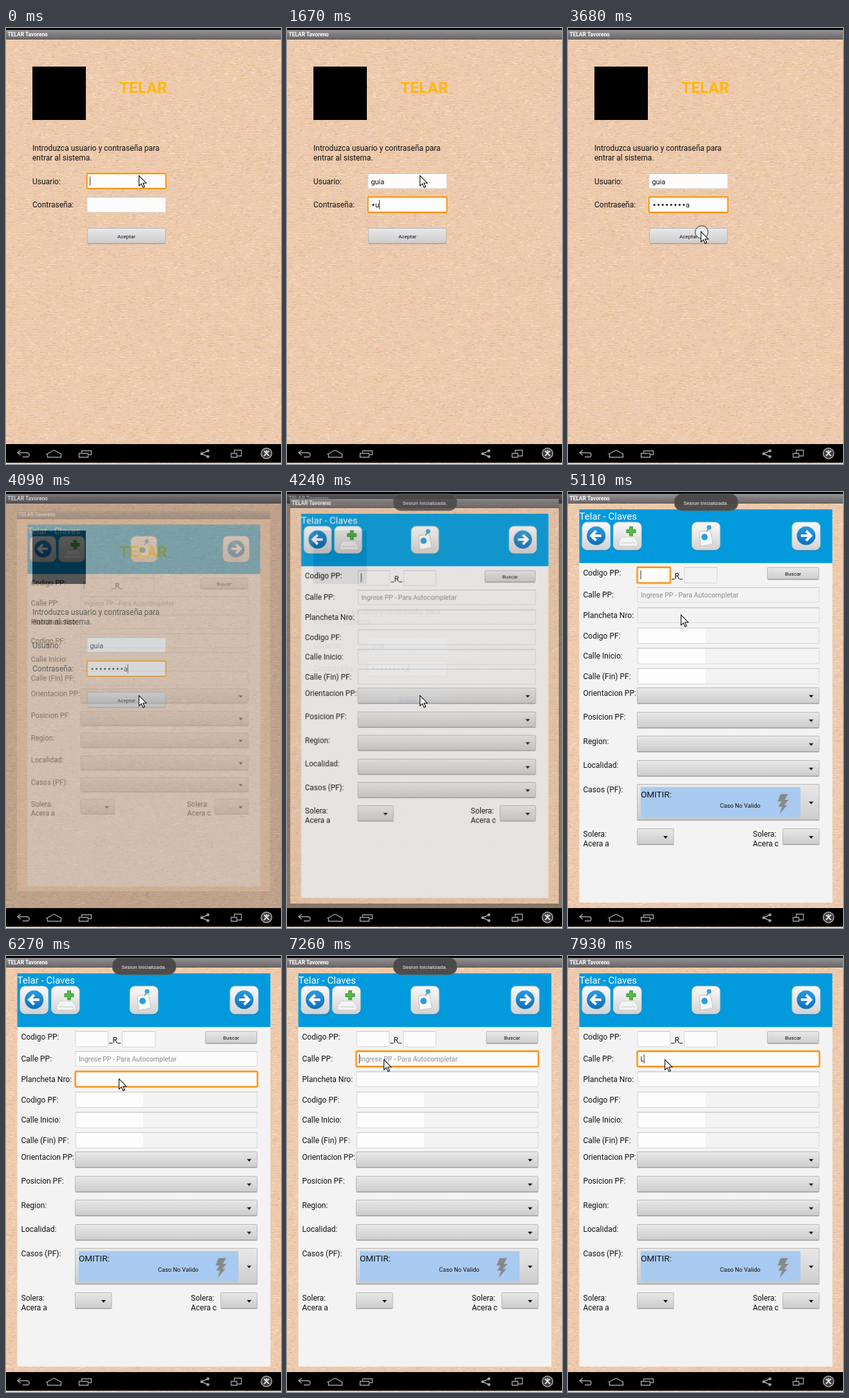
Animation of 427 by 678 pixels, one loop 8000 ms. Source, as an HTML page with a canvas:

```html
<!DOCTYPE html>
<html lang="es">
<head>
<meta charset="utf-8">
<title>Inicio de sesión</title>
<style>
html, body { margin: 0; width: 100%; height: 100%; overflow: hidden; background: #000; }
canvas { display: block; }
</style>
</head>
<body>
<canvas id="stage" width="427" height="678"></canvas>
<script>
const W = 427, H = 678, LOOP = 8000;
const APP = 'TELAR', OWNER = 'Tavoreno', USER = 'guia', PASSWORD = 'culebrina';
const ORANGE = '#f68e16', PANEL = '#f3f3f3';
const stage = document.getElementById('stage').getContext('2d');
const newLayer = (w, h) => {
  const c = document.createElement('canvas');
  c.width = w; c.height = h;
  return c.getContext('2d');
};
const buffer = newLayer(W, H), cloth = newLayer(W, H);
let g = stage; // context being drawn on

// Pointer steps: time, x, y, click ring radius
const POINTER = [
  [0, 206.5, 229.5, 0],
  [3150, 206.5, 245, 0], [3290, 206.5, 280, 0], [3420, 206.5, 305, 0],
  [3550, 206.5, 316.5, 0], [3680, 206.5, 316.5, 10], [3820, 206.5, 316.5, 0],
  [4540, 205, 300, 0], [4680, 202, 268, 0], [4820, 196, 240, 0],
  [4960, 187, 212, 0], [5110, 175.5, 191, 0],
  [5700, 175.5, 191, 10], [5980, 175.5, 191, 0],
  [6720, 168, 180, 0], [6850, 157, 168, 0], [6990, 150.5, 161, 10], [7130, 150.5, 161, 0]
];
const USER_KEYS = [[0, 0], [430, 1], [560, 2], [690, 4]];
const PASS_KEYS = [0, 1390, 1670, 1810, 2090, 2210, 2330, 2600, 2740, 2880].map((t, n) => [t, n]);
const TOAST = [[0, 0], [4240, .85], [4390, 1], [7530, .7], [7660, .35], [7800, 0]];

const at = (keys, t) => keys.filter(k => k[0] <= t).pop();
const within = (t, a, b) => t >= a && t < b;

function rect(x, y, w, h, fill) {
  g.fillStyle = fill;
  g.fillRect(x, y, w, h);
}
function round(x, y, w, h, r, fill, stroke, line = 1) {
  g.beginPath();
  g.roundRect(x, y, w, h, r);
  if (fill) { g.fillStyle = fill; g.fill(); }
  if (stroke) { g.strokeStyle = stroke; g.lineWidth = line; g.stroke(); }
}
function disc(x, y, r, fill) {
  g.beginPath();
  g.arc(x, y, r, 0, 7);
  g.fillStyle = fill;
  g.fill();
}
function shape(d, x, y, fill, stroke, line = 1) {
  const p = new Path2D(d);
  g.save();
  g.translate(x, y);
  if (fill) { g.fillStyle = fill; g.fill(p); }
  if (stroke) { g.strokeStyle = stroke; g.lineWidth = line; g.stroke(p); }
  g.restore();
}
function text(s, x, y, size = 12, color = '#111', weight = 400, align = 'left') {
  g.font = `${weight} ${size}px Roboto, sans-serif`;
  g.fillStyle = color;
  g.textAlign = align;
  g.fillText(s, x, y);
  return g.measureText(s).width;
}
function shade(y, h, ...colors) {
  const f = g.createLinearGradient(0, y, 0, y + h);
  colors.forEach((c, i) => f.addColorStop(i / (colors.length - 1), c));
  return f;
}
const caret = (x, y) => rect(x, y, 1, 14, '#333');

function weave() {
  let seed = 7;
  const rnd = n => (seed = seed * 16807 % 2147483647) % n;
  const rows = ['#f2d0b4', '#e8c1a3', '#f0cfb9', '#e9c8a4'];
  const threads = ['#e6b99f', '#f3d9bd', '#e8cb9c', '#efc4b2'];
  g = cloth;
  for (let y = 0; y < H; y++) {
    rect(0, y, W, 1, rows[y % 4]);
    for (let i = 0; i < 36; i++) rect(rnd(W), y, 2 + rnd(4), 1, threads[rnd(4)]);
  }
}

function field(x, y, w, h, focus, fill = '#fcfcfc') {
  if (focus) {
    round(x, y, w, h, 2, '#fdfdfd', '#fbd9a8', 4);
    round(x, y, w, h, 1.5, null, ORANGE, 1.8);
  } else {
    round(x + .5, y + .5, w - 1, h - 1, 1, fill, '#d9d7d5');
    rect(x, y, w, 1, '#c9c6c3');
  }
}
function button(x, y, w, h, label) {
  round(x + .5, y + .5, w - 1, h - 1, 1.5, shade(y, h, '#e9e9e9', '#dadada', '#cccccc'), '#b9b7b5');
  rect(x + 1, y + h - 1.5, w - 2, 1.5, '#a5a3a1');
  if (label) text(label, x + w / 2, y + h / 2 + 3.3, 8.1, '#111', 400, 'center');
}
function spinner(x, y, w, h) {
  button(x, y, w, h);
  shape('M0 0h7l-3.5 4z', x + w - 16.5, y + h / 2 - 1, '#111');
}

function windowBase() {
  g.drawImage(cloth.canvas, 0, 0);
  rect(0, 0, W, 3, '#000');
  rect(0, 3, W, 15, shade(3, 15, '#979495', '#7d7a7b', '#686566'));
  rect(0, 17, W, 1, '#5c5856');
  text(`${APP} ${OWNER}`, 2.5, 13, 8.4, '#fff', 700);
}

function login(t) {
  windowBase();
  rect(41, 60, 83, 83, '#000');
  text(APP, 176, 101, 24.4, '#fcb910', 700);
  text('Introduzca usuario y contraseña para', 41, 191);
  text('entrar al sistema.', 41, 205.5);
  text('Usuario:', 41, 242.5);
  text('Contraseña:', 41, 279);

  const onPass = t >= 820;
  field(125.5, 226, 123, 24, !onPass);
  field(125.5, 262.5, 123, 24.5, onPass);
  button(126, 311, 122, 25, 'Aceptar');

  const used = text(USER.slice(0, at(USER_KEYS, t)[1]), 130.5, 242.5, 10.8);
  if (t < 130 || within(t, 430, 820)) caret(130 + used, 231);

  const n = at(PASS_KEYS, t)[1], step = 6.55;
  for (let i = 0; i < n - 1; i++) disc(134 + i * step, 275, 1.6, '#111');
  const x = 130.5 + Math.max(0, n - 1) * step;
  const last = text(n ? PASSWORD[n - 1] : '', x, 279, 10.8);
  if (within(t, 820, 1260) || within(t, 1390, 3420) || t >= 3950) caret(x + last, 267.5);
}

function tile(x) {
  round(x, 48.5, 44, 43, 8, 'rgba(0,50,90,.35)');
  round(x, 47, 43.5, 43, 7.5, shade(47, 43, '#fafafa', '#e6e6e6', '#d2d2d2'), '#c9d3d8');
}
function arrowTile(x, dir) {
  tile(x);
  const cx = x + 21.7;
  disc(cx, 68, 14.5, shade(53, 30, '#2a9be0', '#0f6fb8'));
  g.save();
  g.translate(cx, 68);
  g.scale(dir, 1);
  shape('M-8 0H7M0-7.5L7.5 0L0 7.5', 0, 0, null, '#fff', 4);
  g.restore();
}
function header() {
  rect(17.5, 27, 393, 83.5, '#029adc');
  text('Telar - Claves', 17.5, 43, 15.1, '#fff');
  arrowTile(22, -1);
  arrowTile(348, 1);
  tile(70.5);
  shape('M4 0h20l5 8v6h-29v-6z', 79, 70, '#f4f4f4', '#cfcfcf');
  rect(82, 78, 23, 2, '#dcdcdc');
  shape('M0-7.5V7.5M-7.5 0H7.5', 98, 61, null, '#2e8a28', 5.5);
  shape('M0-6.5V6.5M-6.5 0H6.5', 98, 61, null, '#55bf45', 3.5);
  tile(192.5);
  shape('M0 3L17 0l4 22-19 3z', 204, 59, '#fdfdfd', '#c4c4c4');
  disc(212, 70, 5, '#2c9ddc');
  shape('M0 0L-4 7', 219, 55, null, '#777', 1.2);
  disc(219, 55, 3.6, '#3ba3dd');
}

function form(t) {
  windowBase();
  rect(17.5, 27, 393, 611.5, PANEL);
  header();

  const labels = [['Codigo PP:', 130], ['Calle PP:', 164], ['Plancheta Nro:', 195.5], ['Codigo PF:', 227.5],
    ['Calle Inicio:', 259], ['Calle (Fin) PF:', 290.5], ['Orientacion PP:', 316.5], ['Posicion PF:', 354],
    ['Region:', 391.5], ['Localidad:', 429], ['Casos (PF):', 467]];
  labels.forEach(([s, y]) => text(s, 23.5, y));
  text('_R_', 160, 135);

  const loaded = t >= 4390;
  const onCode = within(t, 4390, 5980), onPlan = within(t, 5980, 7130), onStreet = t >= 7130;
  const fresh = t >= 5980 ? '#fcfcfc' : PANEL;
  field(107.5, 117, 51.5, 24.5, onCode, fresh);
  field(180, 117, 52, 25, false, fresh);
  button(309, 117, 81, 19.5, 'Buscar');
  field(107.5, 148, 283, 24, onStreet, fresh);
  field(107.5, 179.5, 283, 24, onPlan, fresh);
  [[211, 4960], [242.5, 4820], [274, 4680]].forEach(([y, from]) => {
    field(107.5, y, 283, 25, false, PANEL);
    if (t >= from) rect(110, y + 1.5, 103, 22.5, '#fdfdfd');
  });

  const typed = t >= 7930;
  const used = text(typed ? 'L' : '', 112.5, 164, 10.5, '#222');
  if (!typed) text('Ingrese PP - Para Autocompletar', 113, 164, 10.5, '#8b8b8b');
  if (t < 5980) caret(112.5, 122);
  if (within(t, 5980, 6270)) caret(112.5, 184);
  if (onStreet) caret(112 + used, 153);

  [304, 342, 379, 417].forEach(y => spinner(107, y, 283.5, 25.5));
  spinner(107, 454, 283.5, loaded ? 57 : 25.5);
  if (loaded) {
    rect(113, 459, 248, 48, '#a9caf0');
    text('OMITIR:', 113, 475, 13.5);
    text('Caso No Valido', 236, 491, 9.2);
    shape('M5 0H17L12 9H18L11 17H16L3 32L7 20H1L6 12H0z', 325, 469.5, '#85898f', '#b3bac3', .8);
  }
  const dy = loaded ? 0 : -32;
  [[23.5, 107, 'a'], [287, 333, 'c']].forEach(([tx, sx, side]) => {
    text('Solera:', tx, 536 + dy);
    text('Acera ' + side, tx, 550.5 + dy);
    spinner(sx, 523 + dy, 57.5, 26);
  });
}

function opening(t) {
  const settled = t >= 4240, s = settled ? .977 : .92;
  login(t);
  rect(0, 3, W, 644, `rgba(0,0,0,${settled ? .42 : .2})`);
  g = buffer;
  form(t);
  g = stage;
  g.save();
  g.globalAlpha = settled ? .88 : .35;
  g.translate(213.5, 322);
  g.scale(s, s);
  g.drawImage(buffer.canvas, 0, 3, W, 644, -213.5, -319, W, 644);
  g.restore();
}

function toast(alpha) {
  g.globalAlpha = alpha;
  round(165, 3, 99, 26, 12, 'rgba(72,70,70,.95)', 'rgba(105,103,103,.8)');
  text('Sesion Inicializada.', 214, 19.5, 8.1, '#f2f2f2', 400, 'center');
  g.globalAlpha = 1;
}

function navBar() {
  const c = '#a2a2a2';
  rect(0, 647, W, 29, '#000');
  shape('M6 0L1 4L6 8M1 4H15Q19 4 19 7.5T15 10.5H9', 17, 656.5, null, c, 1.4);
  shape('M0 6L11 0L22 6V11H1V6z', 63.5, 656.5, null, c, 1.4);
  shape('M0 4H14V10H0zM4 3V0H19V6H15', 113.5, 657.5, null, c, 1.4);
  shape('M11 0L0 5L11 10', 303.5, 657, null, c, 1.4);
  [[304, 662], [313.5, 657.5], [313.5, 666.5]].forEach(p => disc(...p, 2.3, c));
  shape('M5 5V0H16V9H9M0 5H9V11H0z', 349.5, 656.5, null, c, 1.3);
  disc(404.5, 661.5, 9, c);
  disc(404.5, 661.5, 7.3, '#3a3a3a');
  shape('M-4-4L4 4M4-4L-4 4M0-5V0', 404.5, 661.5, null, '#ddd', 2);
}

function pointer(t) {
  const [, x, y, ring] = at(POINTER, t);
  if (ring) {
    disc(x + 1, y + 1, ring, 'rgba(255,255,255,.45)');
    g.strokeStyle = '#222';
    g.lineWidth = 1;
    g.stroke();
  }
  shape('M0 0V16L3.7 12.6L6.3 18.5L8.8 17.4L6.2 11.7H11.3z', x, y, '#fff', '#111', 1.1);
}

function draw() {
  const t = performance.now() % LOOP;
  g = stage;
  if (t < 4090) login(t);
  else if (t < 4390) opening(t);
  else form(t);
  const alpha = at(TOAST, t)[1];
  if (alpha) toast(alpha);
  navBar();
  pointer(t);
  requestAnimationFrame(draw);
}

weave();
draw();
</script>
</body>
</html>
```
